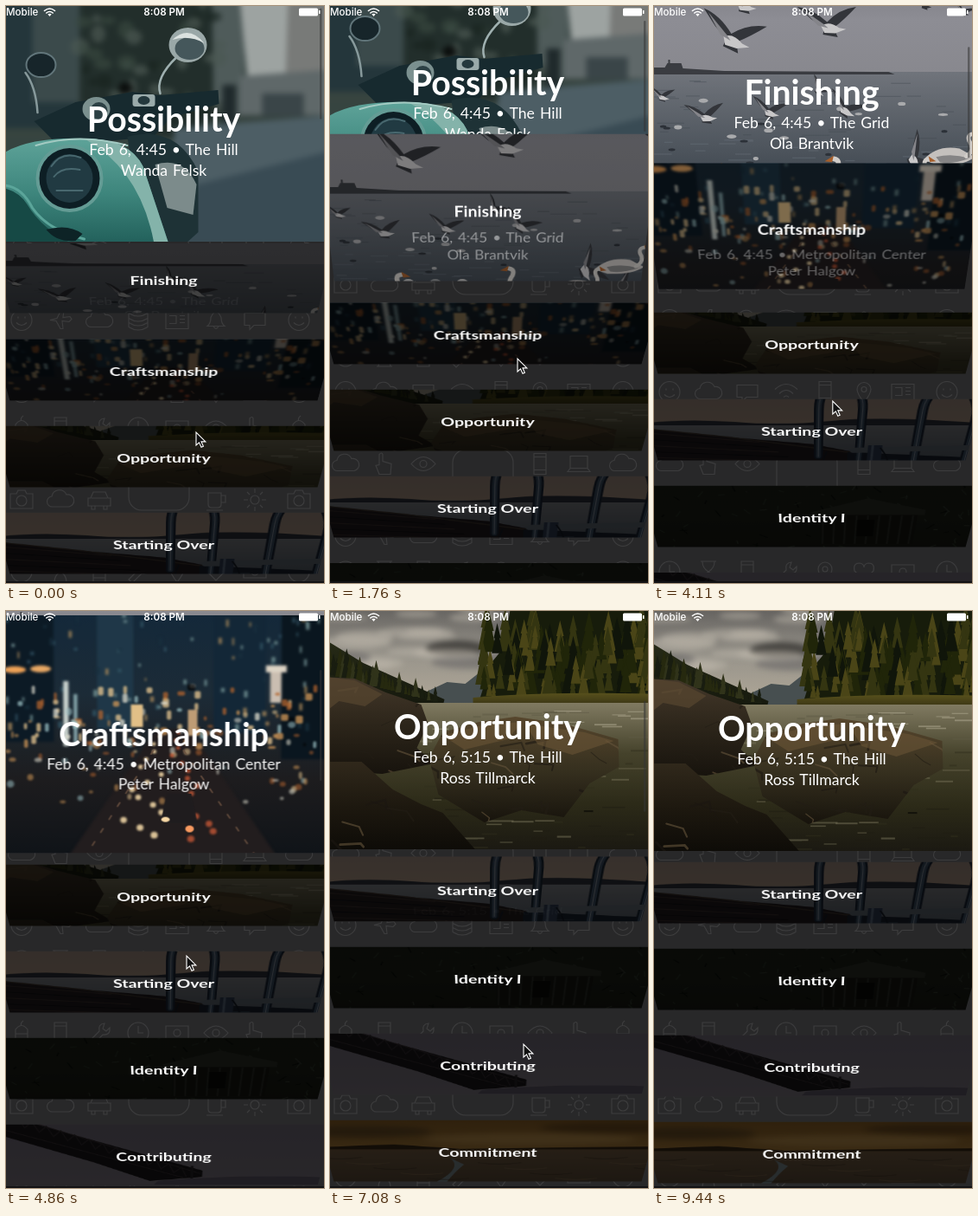
An HTML page for the animation above (9540 ms loop, 368x666 px).

```html
<!DOCTYPE html>
<html lang="en">
<head>
<meta charset="utf-8">
<title>Sessions</title>
<style>
html, body { margin: 0; width: 100%; height: 100%; overflow: hidden; background: #111; }
#stage { position: relative; width: 368px; height: 666px; overflow: hidden; background: #282829; }
#stage > svg { position: absolute; left: 0; top: 0; }
.cell { position: absolute; left: -5.5px; width: 375px; overflow: hidden; background: #111; }
.cell svg { position: absolute; left: 0; top: 50%; margin-top: -140px; }
.cell text { fill: #fff; text-anchor: middle; font: 400 17.6px Lato, sans-serif; word-spacing: 1.5px; }
.cell .title { font-size: 39.2px; font-weight: 700; word-spacing: 0; }
.bar text { fill: #fff; font: 500 11.6px Inter, sans-serif; }
</style>
</head>
<body>
<div id="stage"></div>
<script>
const W = 368, H = 666, LOOP = 9540, STEP = 147.5;
const stage = document.getElementById('stage');

// Drawing helpers that return SVG markup
const path = (d, fill, more = '') => `<path d="${d}" fill="${fill}" ${more}/>`;
const line = (d, stroke, w, more = '') => path(d, 'none', `stroke="${stroke}" stroke-width="${w}" stroke-linecap="round" ${more}`);
const rect = (x, y, w, h, fill, more = '') => `<rect x="${x}" y="${y}" width="${w}" height="${h}" fill="${fill}" ${more}/>`;
const oval = (x, y, rx, ry, fill, more = '') => `<ellipse cx="${x}" cy="${y}" rx="${rx}" ry="${ry}" fill="${fill}" ${more}/>`;
const blur = (n, s) => `<g style="filter:blur(${n}px)">${s}</g>`;
const many = (n, f) => Array.from({ length: n }, (_, i) => f(i)).join('');
let ids = 0;
function gradient(...colors) {
  const id = 'g' + ids++;
  const stops = colors.map((c, i) => `<stop offset="${i / (colors.length - 1)}" stop-color="${c}"/>`).join('');
  return [`<linearGradient id="${id}" x2="0" y2="1">${stops}</linearGradient>`, `url(#${id})`];
}
function fade(y, h, ...colors) {
  const [def, fill] = gradient(...colors);
  return def + rect(-8, y, 384, h, fill);
}
function shade(d, ...colors) {
  const [def, fill] = gradient(...colors);
  return def + path(d, fill);
}
function clip(d, s) {
  const id = 'c' + ids++;
  return `<clipPath id="${id}"><path d="${d}"/></clipPath><g clip-path="url(#${id})">${s}</g>`;
}
function random(seed) {
  return (a = 0, b = 1) => {
    seed = (seed * 16807) % 2147483647;
    return +(a + (b - a) * seed / 2147483647).toFixed(1);
  };
}
const pick = (r, list) => list[Math.floor(r(0, list.length - .01))];
const pine = (x, y, h, fill) => path(`M${x} ${y - h}l${h * .12} ${h * .5}h${-h * .04}l${h * .1} ${h * .5}h${-h * .36}l${h * .1} ${-h * .5}h${-h * .04}z`, fill);
const rock = (d, r, ...colors) => shade(d, ...colors) + clip(d, many(45, () =>
  line(`M${r(-8, 340)} ${r(75, 280)}l${r(6, 24)} ${r(-7, 9)}l${r(-4, 9)} ${r(3, 12)}`, pick(r, ['#1b1711', '#65543b', '#221d15']), r(1, 3), 'opacity=".6"')));

function scooter() {
  const r = random(41);
  const street = fade(-10, 300, '#303c3e', '#37443f', '#33444a')
    + path('M-8-10H82V140H-8z', '#24363b') + path('M30-10H85V110H30z', '#3b4a4b')
    + path('M85-10H245L262 115 205 150H85z', '#222e2b') + path('M238-10H275V125L240 130z', '#4f5b5a')
    + many(45, () => oval(r(85, 250), r(-8, 130), r(4, 11), r(4, 11), pick(r, ['#37473f', '#18231f', '#4b5852']), 'opacity=".7"'))
    + path('M270-10H330V75L280 95z', '#9da3a1') + path('M326-10H380V125L322 112z', '#787a78')
    + path('M270 80L380 72V125H270z', '#5f6869') + rect(250, 90, 16, 48, '#202a2c') + rect(296, 100, 48, 26, '#3a4548')
    + path('M195 140L380 125V290H180z', '#4d5e65') + path('M220 205L380 165V290H190z', '#394b54');
  const front = 'M-8 172Q22 150 90 152Q142 152 158 184L190 280H-8z';
  return `<g transform="translate(0 6)">` + blur(3, street)
    + line('M178 100Q172 82 197 58', '#9fb0b0', 2.5) + line('M36 122Q34 92 22 76', '#87999b', 2.5)
    + oval(210, 44, 22, 20, '#9aa8a8') + oval(212, 48, 17, 13, '#45575b') + path('M192 38Q211 20 229 42Q212 32 192 38z', '#dbe2e0')
    + oval(40, 67, 17, 14, '#17252a', 'stroke="#61757a" stroke-width="2"')
    + path('M32 132L80 110 146 98 178 102 245 96 246 112 190 128 170 150 60 160z', '#172a2f')
    + oval(104, 118, 16, 14, '#7b908f') + oval(107, 120, 10, 10, '#2c4044') + rect(146, 101, 26, 14, '#9aaaaa', 'rx="3"') + oval(159, 108, 7, 5, '#24383d')
    + path('M140 150Q196 135 222 190L222 260 200 280H160z', '#1e3236') + path('M172 182Q205 172 220 205L216 240 186 232z', '#7c8b8b')
    + shade(front, '#5ea399', '#3d857c', '#1f5c57')
    + path('M90 152Q142 152 158 184L190 280H172Q158 190 90 152z', '#84b3aa')
    + path('M-8 208Q14 212 24 228Q44 262 92 280H-8z', '#164945') + line('M-2 206Q18 208 30 232Q48 258 90 268', '#5ba59a', 3)
    + path('M46 257Q72 250 88 262L80 270Q58 272 46 257z', '#0d2326')
    + oval(73, 198, 39, 39, '#649c95') + oval(73, 198, 35, 35, '#0d1e24') + oval(73, 198, 27, 28, '#213a42')
    + line('M52 184Q64 166 86 174M55 196Q64 184 85 188M58 212h30', '#48686f', 2)
    + line('M34 160Q84 145 140 160', '#a4cbc3', 2) + `</g>`;
}

const gull = (x, y, s, turn, fill = '#c8c7c8') => `<g transform="translate(${x} ${y}) rotate(${turn}) scale(${s})">`
  + path('M-4 3L-20-8-38-25Q-18-22 0-4 16-20 38-22 22-6 8 4L13 16-6 12z', '#33353a')
  + path('M-8 1Q2-6 15 4L24 6 10 11-4 10z', fill) + path('M-32-22L-4-1 1 4-12 0z', '#85858a') + `</g>`;
const swan = (x, y, s, flip = 1) => `<g transform="translate(${x} ${y}) scale(${s * flip} ${s})">`
  + path('M-42 8Q-22-14 10-8L32 4Q18 17-22 16z', '#c4c0bd') + path('M-24 4Q0-2 24 6Q2 15-18 12z', '#858485')
  + line('M20 3Q33-5 24-19Q21-28 29-29', '#d0ccc8', 6) + path('M29-33l11 7-9 1z', '#a55f2c') + `</g>`;

function lake() {
  const r = random(77);
  return fade(-10, 125, '#77777e', '#8d8d94', '#88888e') + fade(112, 175, '#70747b', '#4e555d', '#2b343d')
    + path('M-8 107H12l3-5h16l2 6 48 3 190 1 7 3H-8z', '#3a3c41') + rect(16, 98, 2, 10, '#3a3c41')
    + many(90, () => { const y = r(122, 276); return rect(r(-5, 350), y, r(8, 35), 1.2, y > 190 ? '#6b7680' : '#434a52', 'opacity=".4"'); })
    + many(10, () => oval(r(5, 360), r(140, 215), r(3, 6), r(1.5, 2.5), '#a9aaac') + oval(r(5, 360), r(130, 230), r(3, 5), 1.6, '#2c3138'))
    + gull(88, 72, 1, 14) + gull(102, 34, .68, 3) + gull(200, 58, .9, -2) + gull(312, 34, .38, 8, '#33353a') + gull(357, 42, .33, 20, '#33353a')
    + gull(132, 157, .55, 10) + gull(58, 163, .6, -5) + gull(220, 154, .6, 24) + gull(8, 140, .4, 5) + gull(190, 132, .4, 40)
    + gull(302, 212, .75, 60) + gull(344, 246, .8, 70, '#9a9a9d') + many(7, i => oval(85 + i * 11, 232 + i % 3 * 5, 7, 5, i % 2 ? '#8e9194' : '#bcbcbc'))
    + swan(48, 250, 1) + swan(235, 240, .95, -1) + swan(345, 207, .8) + swan(215, 270, 1.05, -1) + swan(294, 236, .8);
}

function city() {
  const r = random(19), glow = ['#d69b59', '#f0cd95', '#b5652f', '#9ec3c6', '#e3e2d3'];
  return fade(-10, 300, '#13293b', '#1c2c38', '#1d1c1e', '#0d1217')
    + blur(1.5, path('M-8-10H55V145H-8z', '#0c1a26') + path('M105-10h42V130h-42z', '#1f3849') + path('M240-10h60V135h-60z', '#132838') + path('M318-10h60V165h-60z', '#0a161f')
      + many(90, () => rect(r(-5, 360), r(-2, 125), r(2, 5), r(3, 9), pick(r, ['#35596a', '#7d9c9e', '#ae8d5d', '#18303f']), 'opacity=".75"'))
      + rect(66, 75, 6, 75, '#cfd8d3') + rect(78, 90, 4, 56, '#8eb0b5') + oval(10, 62, 13, 4, '#f3a558') + oval(40, 61, 12, 4, '#efac66')
      + rect(305, 58, 13, 42, '#cfc3b5') + rect(300, 57, 24, 8, '#e2d8c9')
      + path('M174 130L70 280H315L212 130z', '#221d1e'))
    + blur(.8, many(75, () => rect(r(0, 362), r(78, 150), r(3, 9), r(3, 11), pick(r, glow), 'rx="2" opacity=".75"'))
      + many(75, () => oval(r(0, 368), r(110, 215), r(1.5, 4.5), r(1.5, 4.5), pick(r, glow), 'opacity=".55"'))
      + many(30, i => oval(186 + (i % 2 ? 1 : -1) * r(5, 15 + i * 2), 130 + i * 4.4, 2 + i / 13, 2 + i / 15, i % 2 ? '#bd5535' : '#ffe3af', 'opacity=".85"'))
      + rect(144, 102, 14, 26, '#e7c48b') + rect(210, 108, 11, 30, '#c3a078'))
    + path('M186 205h28l7 34h-43z', '#201d1f') + oval(184, 235, 5, 3, '#ffdfaa') + oval(212, 246, 5, 4, '#ff9e62')
    + line('M170 155L92 276M205 155L288 276', '#6b5140', 1.6, 'stroke-dasharray="5 13"');
}

function river() {
  const r = random(9);
  return fade(-10, 125, '#5d5b59', '#98948b', '#b3aa99')
    + blur(3, many(20, () => oval(r(0, 220), r(-5, 75), r(20, 50), r(3, 9), pick(r, ['#5f5d5e', '#bcb6aa']), 'opacity=".5"')))
    + path('M92 104L135 84 156 86 194 56 250 90V110H90z', '#474f50') + shade('M-8 34L38 62 132 104 130 112H-8z', '#272b17', '#15180d')
    + many(34, i => pine(i * 3.8 - 4, 74 + i * 1, r(18, 38) - i * .5, pick(r, ['#191d10', '#26290f', '#30331a'])))
    + path('M172 106L186 62 200 45 210-10H380V118z', '#171c0b')
    + many(110, i => { const x = r(174, 372); return pine(x, r(40, 108), r(20, 55), pick(r, ['#10150a', '#202509', '#343511', '#4a4517'])); })
    + shade('M165 102Q260 94 380 98V118H165z', '#57501c', '#2a2611') + fade(108, 175, '#807a61', '#45422b', '#2c2a18', '#191711')
    + many(120, () => { const y = r(110, 276); return rect(r(95, 350), y, r(6, 32), r(1, 2.2), pick(r, y < 150 ? ['#b4ad95', '#5f5b44'] : ['#79755a', '#1f1d12', '#312f1c']), 'opacity=".5"'); })
    + rock('M-8 78L28 80 64 96 105 110 113 132 100 160 120 178 60 190-8 186z', r, '#44382a', '#2c251a', '#17130d')
    + path('M-8 78L28 82 60 98 40 112 10 106-8 120z', '#57472f', 'opacity=".7"')
    + rock('M114 172L130 142 172 130 214 124 270 132 333 150 334 182 300 201 270 240 221 232 178 246 125 214z', r, '#57462d', '#36301f', '#17130c')
    + path('M130 146L175 134 222 130 205 150 155 162zM225 132L294 142 328 152 280 168 240 156z', '#6c5737', 'opacity=".55"')
    + rock('M-8 176L36 176 72 208 105 225 130 235 170 280H-8z', r, '#30281b', '#1d180f', '#0d0b07');
}

function pier() {
  return fade(-10, 136, '#697285', '#918e95', '#b39d90', '#bfa690') + fade(124, 160, '#8c8e93', '#525c69', '#1d2732')
    + path('M-8 124Q40 116 95 122T205 120 368 123V127H-8z', '#30343f')
    + path('M-8 133L82 146 182 158 252 177 252 257-8 280z', '#241d1f')
    + many(13, i => line(`M-8 ${140 + i * 10.5}L${120 + i * 11} ${155 + i * 8.5}`, i % 2 ? '#121216' : '#3d322f', 1.5))
    + line('M-8 133L82 146 252 177', '#40362f', 2) + path('M-8 270L225 256V266L90 280H-8z', '#8d9296')
    + path('M225 172L380 182V280H225z', '#1a2431')
    + many(14, i => rect(262 + i * 37 % 90, 185 + i * 6, 25, 1.5, '#48566b', 'opacity=".5"'))
    + [['M190 180V102C190 48 238 48 239 102V280', 11], ['M306 222V104C306 52 366 52 368 118V250', 12]].map(([d, w]) =>
      line(d, '#1a2636', w) + line(d, '#43556b', w - 5) + line(d, '#8f9aa8', 1.2)).join('')
    + line('M232 169L376 164', '#69727d', 9) + line('M306 220L376 238', '#36465a', 8) + rect(249, 160, 17, 120, '#33435a') + rect(253, 160, 3, 120, '#66758a')
    + line('M264 165Q290 205 262 238Q230 265 204 225Q190 200 200 172', '#151b27', 2);
}

function cabin() {
  const r = random(55);
  return fade(-10, 300, '#1d221b', '#1e2118', '#0f120b')
    + many(130, i => line(`M${r(-5, 370)} ${r(60, 215)}l${r(-9, 9)} ${r(-9, 9)}`, ['#2e3829', '#0c100a', '#373f32'][i % 3], 1.5))
    + path('M180 128L245 106 312 124V132H184z', '#30342b') + rect(192, 132, 112, 50, '#171912')
    + many(9, i => rect(194 + i * 13, 133, 2, 48, '#30322a')) + rect(235, 140, 20, 28, '#090b08');
}

function bridge() {
  return fade(-10, 300, '#6d697b', '#837c8c', '#8f8791', '#8a8591')
    + path('M-8 50L45 88 228 160V171L165 178 100 146-8 100z', '#1d191d') + line('M10 72L225 165M-8 90L205 172', '#3d3437', 1.2)
    + many(14, i => line(`M${i * 15} ${78 + i * 6.5}l8-8 6 16`, '#383035', 1.2)) + rect(214, 152, 3, 24, '#2a262b')
    + path('M175 178Q270 166 380 172V185H170z', '#6b6574');
}

function beach() {
  return fade(-10, 155, '#4d3516', '#966425', '#cb9645') + fade(132, 150, '#83694a', '#5a4a38', '#2d241b')
    + blur(4, oval(230, 116, 120, 9, '#d9a556') + oval(40, 104, 80, 9, '#7c5a2b') + oval(325, 98, 85, 8, '#7d5624'))
    + path('M-8 128L75 124 150 131 380 127V132H-8z', '#3f2c17')
    + path('M138 146Q155 165 110 194L90 230H112Q130 184 154 157z', '#8c9ba0')
    + many(14, i => line(`M${i * 31 - 15} ${145 + i % 5 * 9}q25 5 50 0`, i % 2 ? '#9b7f5a' : '#4a3a2a', 1.5, 'opacity=".5"'));
}

function lighthouse() {
  return fade(-10, 170, '#586672', '#68737b', '#737b7f') + fade(145, 140, '#4b6170', '#293e4b')
    + path('M225 180L245 137 278 112 310 80 380 60V280H210z', '#544936') + path('M265 130L320 92 380 80V150L302 175z', '#776449')
    + line('M250 160L290 140 315 190M325 95L340 145 375 162', '#332d22', 4)
    + path('M110 112h10l5 52h-20z', '#c5c6c4') + path('M108 128h14l2 16h-18z', '#9d3531') + rect(109, 106, 12, 9, '#8a302c') + path('M90 165Q118 155 142 169z', '#2c302f');
}

const sessions = [
  [scooter, 'Possibility', 'Feb 6, 4:45 • The Hill', 'Wanda Felsk'],
  [lake, 'Finishing', 'Feb 6, 4:45 • The Grid', 'Ola Brantvik'],
  [city, 'Craftsmanship', 'Feb 6, 4:45 • Metropolitan Center', 'Peter Halgow'],
  [river, 'Opportunity', 'Feb 6, 5:15 • The Hill', 'Ross Tillmarck'],
  [pier, 'Starting Over', 'Feb 6, 5:15 • The Grid', 'Nadia Korvelt'],
  [cabin, 'Identity I'], [bridge, 'Contributing'], [beach, 'Commitment'], [lighthouse, 'Identity II']
];

// Wallpaper of outlined icons
const icons = {
  camera: 'M-13-7h7l2-4h8l2 4h7v17h-26zM-6 1a6 6 0 1 0 12 0a6 6 0 1 0-12 0',
  cloud: 'M-9 8a6 6 0 0 1-1-12a9 9 0 0 1 17-2a7 7 0 0 1 3 14z',
  car: 'M-13 7v-9h3l3-7h14l3 7h3v9zM-9 7v4h4v-4M5 7v4h4v-4M-9-2h18',
  cup: 'M-9-8h15v13q0 4-4 4h-7q-4 0-4-4zM6-5h5v8h-5M-11 12h19',
  sun: 'M-5 0a5 5 0 1 0 10 0a5 5 0 1 0-10 0M0-13v5M0 8v5M-13 0h5M8 0h5M-9-9l3 3M6 6l3 3M-9 9l3-3M6-6l3-3',
  smile: 'M-12 0a12 12 0 1 0 24 0a12 12 0 1 0-24 0M-6 3q6 6 12 0M-4-4v2M4-4v2',
  plane: 'M-12 0l8-2 5-10h3l-1 9 8-1 2 3-3 3-8-1 1 9h-3l-5-9z',
  disks: 'M-11-8q11-7 22 0v16q-11 7-22 0zM-11-8q11 7 22 0M-11-2q11 7 22 0M-11 3q11 7 22 0',
  news: 'M-13-9h26v19h-26zM-9-5h8v9h-8M3-5h6M3-1h6M3 3h6',
  bell: 'M-10 7q4-3 4-10q6-13 12 0q0 7 4 10zM-3 7q3 6 6 0',
  chat: 'M-12-8h24v14h-13l-5 5v-5h-6z',
  glass: 'M-9-12h18M-9 12h18M-7-12q0 8 7 12q7 4 7 12M7-12q0 8-7 12q-7 4-7 12',
  tool: 'M-11 9l11-11q-2-8 6-9l-2 6 4 3 4-4q1 9-8 8l-11 11z',
  pin: 'M0 12q-8-10-8-15a8 8 0 1 1 16 0q0 5-8 15zM-3-3a3 3 0 1 0 6 0a3 3 0 1 0-6 0',
  heart: 'M0 10l-11-11q-2-9 6-9q5 1 5 5q0-4 5-5q8 0 6 9z',
  wifi: 'M-13-3q13-12 26 0M-8 2q8-8 16 0M-3 6q3-3 6 0',
  phone: 'M-7-12h14v24h-14zM-7-8h14M-7 7h14',
  mouse: 'M-7-4q7-9 14 0v10q-7 9-14 0zM-7 1h14M0-8q-2-3 2-6',
  clock: 'M-12 0a12 12 0 1 0 24 0a12 12 0 1 0-24 0M0-8v8h6',
  cash: 'M-13-8h26v15h-26zM-4 0a4 4 0 1 0 8 0a4 4 0 1 0-8 0',
  eye: 'M-14 0q14-16 28 0q-14 16-28 0zM-4 0a4 4 0 1 0 8 0a4 4 0 1 0-8 0',
  hand: 'M-6 12l-4-10 4-1v-12q3-3 4 0v8l10 3-1 12z',
  laptop: 'M-10-9h20v14h-20zM-13 9h26l-3-4h-20z'
};
const rows = ['camera cloud car - - cup sun', 'smile plane cloud disks news bell chat', 'clock glass phone tool pin heart cash',
  'smile cloud chat wifi phone pin news', 'mouse phone tool clock cash eye hand', 'cloud hand eye - - phone laptop'];
const wallpaper = rows.map((row, j) => row.split(' ').map((name, i) => icons[name]
  ? `<path transform="translate(${18 + i * 45} ${23 + j * 41.5})" d="${icons[name]}"/>` : '').join('')).join('');
const bubble = y => `<rect x="142" y="${y}" width="70" height="70" rx="15"/>`;
stage.innerHTML = `<svg width="${W}" height="${H}"><defs><pattern id="tile" width="321" height="249" y="49" patternUnits="userSpaceOnUse">
  <g fill="none" stroke="#3c3c3d" stroke-width="1.1">${wallpaper}${bubble(-35)}${bubble(214)}</g></pattern></defs>${rect(0, 0, W, H, 'url(#tile)')}</svg>`;

const cells = sessions.map(([art, title, place = '', speaker = '']) => {
  const el = document.createElement('div');
  el.className = 'cell';
  el.innerHTML = `<svg width="375" height="280" viewBox="-187.5 -140 375 280"><g transform="translate(-182 -137)">${art()}</g>
    ${rect(-188, -140, 376, 280, '#000', 'class="cover"')}<text class="title" y="13">${title}</text>
    <g class="info"><text y="40">${place}</text><text y="63.5">${speaker}</text></g></svg>`;
  stage.append(el);
  const [cover, name, info] = ['.cover', '.title', '.info'].map(s => el.querySelector(s));
  return { el, cover, name, info };
});

stage.insertAdjacentHTML('beforeend', `<svg class="bar" width="${W}" height="${H}">
  <rect id="thumb" x="363" width="2.5" height="128" rx="1.2" fill="#353535" opacity=".55"/>
  <text x="0" y="11">Mobile</text><text x="183" y="11" text-anchor="middle" style="font-weight:600">8:08 PM</text>
  ${line('M44.5 5.5q6-5 12 0M46.8 8q3.7-3 7.4 0', '#fff', 1.6)}${path('M50.5 12l-2.2-2.4q2.2-1.6 4.4 0z', '#fff')}
  ${rect(339, 2.5, 22, 9, '#fff', 'rx="1.5"')}${rect(362, 5, 1.5, 4, '#fff')}
  ${rect(0, 664, W, 2, '#121214')}
  <path id="arrow" d="M0 0V15l3.5-3.2 2.5 5.5 2.4-1-2.4-5.4h4.9z" fill="#111" stroke="#fff" stroke-width="1.1"/></svg>`);
const thumb = document.getElementById('thumb'), arrow = document.getElementById('arrow');

// Tick, scroll position in pages, pointer x and y
const moves = [
  [0, .052, 220, 492], [12, .47, 217, 407], [14, .58, 216, 385], [18, .98, 212, 430], [21, 1, 202, 519], [23, 1, 205, 522],
  [25, 1, 205, 522], [30, 1.6, 208, 412], [33, 1.969, 209, 398], [35, 2, 212, 470], [38, 2.03, 226, 530], [43, 2.615, 228, 424],
  [46, 2.97, 226, 440], [48, 3.02, 224, 500], [51, 3.72, 221, 360], [53, 4, 220, 321], [55, 3.97, 221, 325], [58, 3.5, 226, 420],
  [61, 3.02, 230, 580], [62, 3, 235, 690], [65, 3, 235, 690]
];
function pose(tick) {
  const i = Math.max(1, moves.findIndex(m => m[0] >= tick));
  const a = moves[i - 1], b = moves[i], u = (tick - a[0]) / (b[0] - a[0]);
  return a.map((v, j) => v + (b[j] - v) * u);
}

function draw(ms) {
  const [, page, x, y] = pose(Math.floor((ms % LOOP + 22) / STEP));
  const top = Math.floor(page), p = page - top;
  cells.forEach(({ el, cover, name, info }, i) => {
    const n = i - top;
    const open = n === 0 ? 1 : n === 1 ? p : 0;
    const at = n === 0 ? -100 * p : n === 1 ? 280 - 280 * p : 180 + 100 * (n - p);
    el.style.display = n < 0 || at > 690 ? 'none' : '';
    el.style.top = at - 3 + 'px';
    el.style.height = 100 + 180 * open + 'px';
    el.style.transform = open === 1 ? 'none' : `perspective(665px) rotateX(${-45 * (1 - open)}deg)`;
    cover.setAttribute('opacity', .71 * (1 - open));
    name.setAttribute('transform', `scale(${Math.max(open, .5)})`);
    info.setAttribute('opacity', open);
  });
  thumb.setAttribute('y', 1 + page * 34);
  thumb.style.display = p ? '' : 'none';
  arrow.setAttribute('transform', `translate(${x} ${y})`);
}

const start = performance.now();
function tick() {
  draw(performance.now() - start);
  requestAnimationFrame(tick);
}
tick();
</script>
</body>
</html>
```
